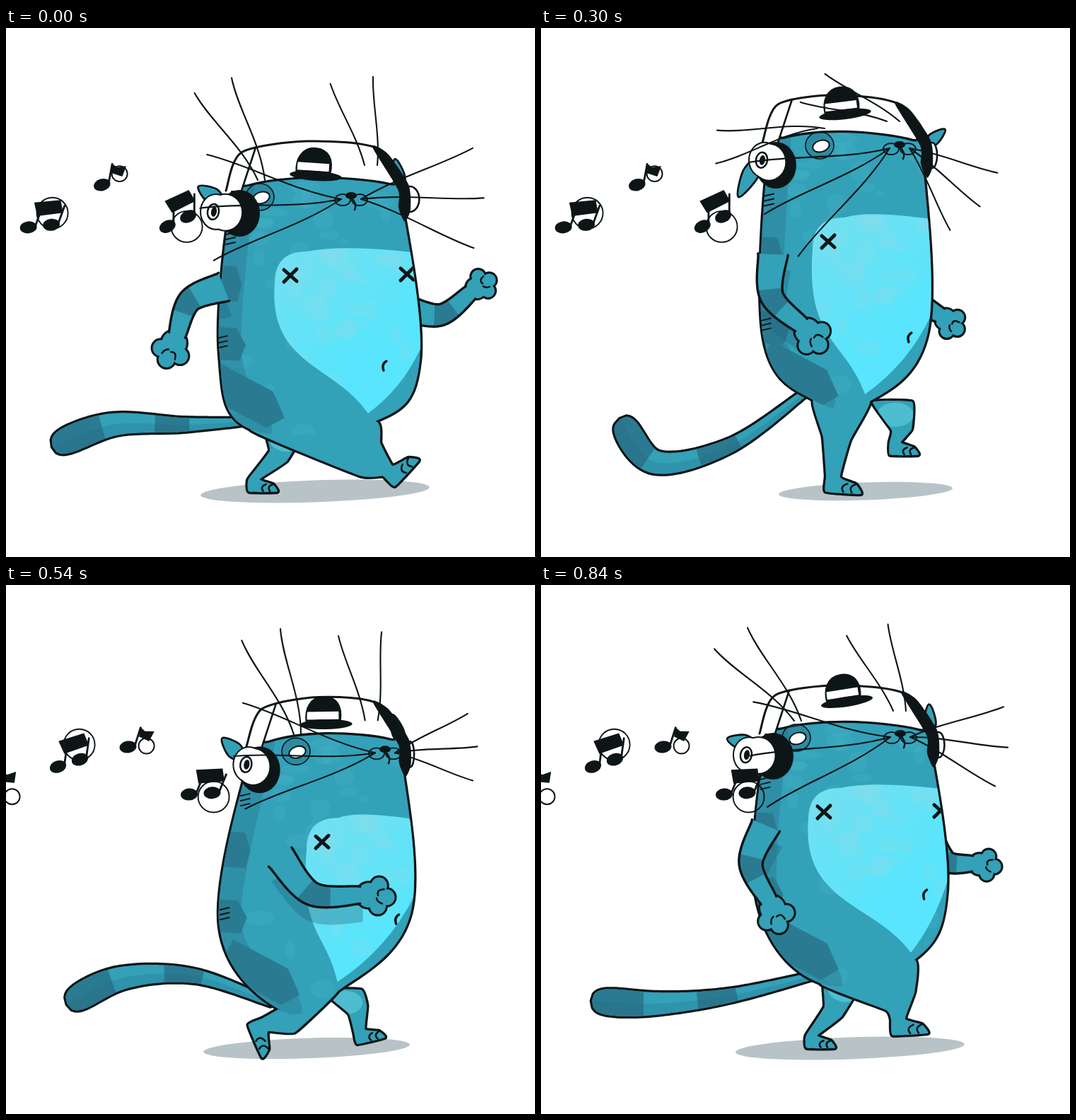
An HTML page with a canvas that plays this animation: 748 by 748 pixels, repeating every 0.9 s.

```html
<!DOCTYPE html>
<html lang="en">
<head>
<meta charset="utf-8">
<title>Strolling cat</title>
<style>
html, body { margin: 0; width: 100%; height: 100%; overflow: hidden; background: #fff; }
canvas { display: block; width: 100vmin; height: 100vmin; }
</style>
</head>
<body>
<canvas id="stage" width="748" height="748"></canvas>
<script>
const g = document.getElementById('stage').getContext('2d');
const STEP = 60, STEPS = 15;
const INK = '#0d1517', TEAL = '#33a1b8', DARK = '#2a7b91', SHADE = 'rgba(32,98,122,.35)';

// Walk cycle. body: head left and right, right side, crotch, rump, left side.
// belly: top corner and tip. legs: knee, ankle, foot angle (far one starts with its hip).
// arm: shoulder, wrist. tail: two bends and tip. face: eye, nose, cup depth.
// swing: whisker angle. lift: hat height. shadow: centre and reach.
const poses = [
  { step: 0, body: [320,224, 556,222, 585,470, 522,556, 345,567, 302,460], belly: [380,316, 512,545],
    leg: [515,610, 539,627, -47], farLeg: [.28, 385,605, 350,638, 0], arm: [308,366, 242,434], farArm: [657,374],
    tail: [250,561, 150,561, 66,592], face: [361,240, 488,240, -33], swing: [-117], lift: [14], shadow: [437,162] },
  { step: 3, body: [325,198, 548,204, 567,450, 455,556, 378,538, 297,435], belly: [370,288, 453,550],
    leg: [424,600, 424,633, 0], farLeg: [1.05, 458,600, 420,605, 90], arm: [312,330, 252,424], farArm: [619,387],
    tail: [250,562, 155,568, 88,590], face: [390,212, 512,207, -22], swing: [-143], lift: [20], shadow: [438,112] },
  { step: 5, body: [322,156, 538,160, 547,430, 465,528, 385,526, 315,440], belly: [384,268, 458,518],
    leg: [418,580, 412,634, 4], farLeg: [1.4, 510,568, 500,586, 0], arm: [328,320, 368,420], farArm: [564,406],
    tail: [268,590, 162,614, 112,553], face: [396,167, 507,168, -16], swing: [-190], lift: [36], shadow: [459,123] },
  { step: 7, body: [356,226, 564,222, 576,465, 475,595, 362,606, 302,480], belly: [429,334, 450,580],
    leg: [378,620, 348,637, 0], farLeg: [1, 512,605, 541,631, -40], arm: [383,374, 478,457], farArm: [525,440],
    tail: [270,565, 160,562, 84,594], face: [440,233, 552,238, -6], swing: [-98], lift: [31], shadow: [459,166] },
  { step: 10, body: [345,222, 553,218, 570,465, 466,564, 400,598, 302,485], belly: [423,327, 478,552],
    leg: [410,612, 375,613, 100], farLeg: [1.1, 490,598, 478,630, 0], arm: [390,390, 512,429], farArm: [520,430],
    tail: [265,547, 165,553, 88,592], face: [398,238, 528,234, -20], swing: [-116], lift: [21], shadow: [408,136] },
  { step: 12, body: [325,190, 545,196, 564,440, 487,548, 400,551, 306,440], belly: [408,303, 485,520],
    leg: [463,585, 444,607, 35], farLeg: [.3, 422,595, 416,634, 0], arm: [362,348, 412,444], farArm: [552,404],
    tail: [265,582, 160,600, 71,602], face: [384,201, 515,197, -41], swing: [-160], lift: [22], shadow: [408,123] },
  { step: 14, body: [318,204, 547,206, 574,430, 528,530, 395,563, 306,450], belly: [378,287, 523,520],
    leg: [508,588, 504,614, -3], farLeg: [.25, 413,603, 382,637, 0], arm: [318,340, 322,446], farArm: [610,394],
    tail: [265,581, 160,592, 72,588], face: [363,217, 508,213, -34], swing: [-129], lift: [40], shadow: [437,162] }
];

const RAD = Math.PI / 180;
const mix = (a, b, u) => a + (b - a) * u;
const mixAll = (a, b, u) => a.map((v, i) => mix(v, b[i], u));
const shift = ([x, y], dx, dy) => [x + dx, y + dy];
const polar = ([x, y], len, deg) => [x + len * Math.cos(deg * RAD), y + len * Math.sin(deg * RAD)];
const toward = (a, b, d) => mixAll(a, b, d / Math.hypot(b[0] - a[0], b[1] - a[1]));
const pairs = a => a.flatMap((v, i) => i % 2 ? [] : [[v, a[i + 1]]]);
const random = n => (Math.sin(n * 12.9898) * 43758.5 % 1 + 1) % 1;
const fill = (path, color) => { g.fillStyle = color; g.fill(path); };
const ink = (path, w = 3) => { g.strokeStyle = INK; g.lineWidth = w; g.stroke(path); };

function poseAt(step) {
  let i = poses.length - 1;
  while (poses[i].step > step) i--;
  const a = poses[i], b = poses[(i + 1) % poses.length];
  const u = (step - a.step) / ((b.step || STEPS) - a.step), out = {};
  for (const part in a) if (part !== 'step') out[part] = mixAll(a[part], b[part], u);
  return out;
}

function curve(pts, k = .17, open = false) {
  const n = pts.length, path = new Path2D();
  const at = i => pts[open ? Math.max(0, Math.min(n - 1, i)) : (i + n) % n];
  path.moveTo(...pts[0]);
  for (let i = 0; i < n - (open ? 1 : 0); i++) {
    const [p, q, r, s] = [at(i - 1), at(i), at(i + 1), at(i + 2)];
    path.bezierCurveTo(q[0] + (r[0] - p[0]) * k, q[1] + (r[1] - p[1]) * k,
      r[0] - (s[0] - q[0]) * k, r[1] - (s[1] - q[1]) * k, ...r);
  }
  if (!open) path.closePath();
  return path;
}

function poly(pts, open) {
  const path = new Path2D();
  pts.forEach(p => path.lineTo(...p));
  if (!open) path.closePath();
  return path;
}

function oval([x, y], rx, ry = rx, deg = 0) {
  const path = new Path2D();
  path.ellipse(x, y, rx, ry, deg * RAD, 0, 7);
  return path;
}

function arc(a, c, b) {
  const path = new Path2D();
  path.moveTo(...a);
  path.quadraticCurveTo(...c, ...b);
  return path;
}

function inside(path, draw) {
  g.save();
  g.clip(path);
  draw();
  g.restore();
}

// Turns local coordinates at a point into stage coordinates.
const frame = ([x, y], deg, size = 1) => {
  const c = Math.cos(deg * RAD) * size, s = Math.sin(deg * RAD) * size;
  return (u, v) => [x + u * c - v * s, y + u * s + v * c];
};

// A limb of changing width along a smooth centre line.
function tube(pts, width) {
  const n = pts.length, N = 60, mid = [], left = [], right = [];
  for (let i = 0; i <= N; i++) {
    const s = i / N * (n - 1), j = Math.min(n - 2, Math.floor(s)), t = s - j;
    const v = m => pts[Math.max(0, Math.min(n - 1, j + m))];
    mid.push([0, 1].map(c => {
      const m1 = (v(1)[c] - v(-1)[c]) / 2, m2 = (v(2)[c] - v(0)[c]) / 2, d = v(1)[c] - v(0)[c];
      return v(0)[c] + t * (m1 + t * (3 * d - 2 * m1 - m2 + t * (m1 + m2 - 2 * d)));
    }));
  }
  mid.forEach((m, i) => {
    const p = mid[Math.max(0, i - 1)], q = mid[Math.min(N, i + 1)];
    const dx = q[0] - p[0], dy = q[1] - p[1], w = width(i / N) / (Math.hypot(dx, dy) || 1);
    left.push(shift(m, dy * w, -dx * w));
    right.push(shift(m, -dy * w, dx * w));
  });
  const part = (from, to, l = left, r = right) => {
    const i = Math.round(from * N), j = Math.round(to * N) + 1;
    return poly([...l.slice(i, j), ...r.slice(i, j).reverse()]);
  };
  return { mid, left, right, part };
}

function drawTail(rump, bends) {
  const t = tube([shift(rump, -12, -10), ...pairs(bends)],
    u => (5 + 18 * u ** 1.2) * Math.sqrt(1 - Math.max(0, (u - .72) / .28) ** 3));
  const whole = t.part(0, 1);
  ink(whole, 6.5);
  fill(whole, TEAL);
  fill(t.part(.72, 1), DARK);
  fill(t.part(.3, .46), DARK);
  fill(t.part(0, 1, t.left, t.mid), 'rgba(32,98,122,.22)');
}

// Elbows always bend away from the walking direction.
function armLine(shoulder, wrist, sag = .22) {
  const [dx, dy] = [wrist[0] - shoulder[0], wrist[1] - shoulder[1]];
  return [shoulder, shift(mixAll(shoulder, wrist, .5), -dy * sag, dx * sag), wrist];
}

function drawArm(line, size) {
  const t = tube(line, u => (21 - 9 * u) * (size + 1) / 2), [, elbow, wrist] = line;
  const at = frame(wrist, Math.atan2(wrist[1] - elbow[1], wrist[0] - elbow[0]) / RAD, size);
  const hand = [[12, 0, 17], [26, -14, 11], [37, 2, 11], [25, 15, 11]].map(([u, v, r]) => oval(at(u, v), r * size));
  hand.forEach(h => ink(h, 6));
  hand.forEach(h => fill(h, TEAL));
  fill(t.part(0, 1), TEAL);
  fill(t.part(.42, .68), DARK);
  ink(poly(t.left, true), 3.4);
  ink(poly(t.right, true), 3.4);
  ink(arc(at(33, -9), at(22, -8), at(25, 0)), 2.5);
  ink(arc(at(31, 11), at(24, 9), at(23, 4)), 2.5);
}

function legShape(back, front, [kx, ky, ax, ay, deg], knee, size) {
  const hip = mixAll(back, front, .5), dx = ax - hip[0], dy = ay - hip[1];
  const w = knee / Math.hypot(dx, dy), at = frame([ax, ay], deg, size);
  const path = curve([back, [kx - dy * w, ky + dx * w], at(-9, 0), at(-8, 22), at(42, 22), at(34, 9), at(11, 0),
    [kx + dy * w, ky - dx * w], front], .06);
  const toes = () => [17, 29].forEach(x => ink(arc(at(x + 5, 9), at(x - 6, 13), at(x, 21)), 2.6));
  return { path, toes };
}

function leaf(tip, base, w) {
  const len = Math.hypot(base[0] - tip[0], base[1] - tip[1]);
  const at = frame(tip, Math.atan2(base[1] - tip[1], base[0] - tip[0]) / RAD);
  const path = curve([tip, at(len * .55, -w), base, at(len * .55, w)], .15);
  ink(path, 5.5);
  fill(path, TEAL);
}

function bellyShape([ax, ay, tx, ty], [rx, ry]) {
  const w = tx - ax, h = ty - ay, path = new Path2D();
  path.moveTo(ax, ay + 45);
  path.bezierCurveTo(ax - 10, ay + .7 * h, tx - .35 * w, ty - .3 * h, tx, ty);
  path.quadraticCurveTo(mix(tx, rx, .7), mix(ty, ry, .5), rx + 5, ry - 25);
  path.lineTo(rx + 30, ay + 6);
  path.quadraticCurveTo(mix(ax, rx, .5), ay - 12, ax + 45, ay);
  path.quadraticCurveTo(ax, ay, ax, ay + 45);
  return path;
}

function blotches(x, y, w, h, count, color) {
  for (let i = 1; i <= count; i++)
    fill(oval([x + random(i) * w, y + random(i + 50) * h], 6 + random(i + 90) * 16, 5 + random(i + 130) * 10), color);
}

function drawBody(p, [tl, tr, right, crotch, rump, left]) {
  const body = curve([toward(tl, left, 24), toward(tl, tr, 24), shift(mixAll(tl, tr, .5), 0, -10),
    toward(tr, tl, 14), toward(tr, right, 20), right, crotch, rump, left], .18);
  const leg = legShape(rump, crotch, p.leg, 13 + .08 * Math.hypot(crotch[0] - rump[0], crotch[1] - rump[1]), 1);
  ink(body, 6.5);
  ink(leg.path, 6.5);
  fill(body, TEAL);
  fill(leg.path, TEAL);
  const belly = bellyShape(p.belly, right), [bx, by] = p.belly;
  const turn = tr[0] - p.face[2];
  inside(body, () => {
    blotches(tl[0], tl[1], 240, 380, 34, 'rgba(92,192,210,.12)');
    g.strokeStyle = 'rgba(32,98,122,.28)';
    g.lineWidth = 62;
    g.stroke(curve([rump, left, tl], .17, true));
    const band = (u, reach, size) => {
      const at = frame(mixAll(left, u < 0 ? rump : tl, Math.abs(u)), u < 0 ? 28 : 4);
      fill(poly([at(-40, -size), at(reach * .6, -size), at(reach, 0), at(reach * .8, size), at(-40, size)]), DARK);
    };
    band(-.5, 80, 25);
    band(.06, 36, 23);
    band(.42, 24, 25);
    const tone = g.createLinearGradient(bx, by, bx + 120, by + 150);
    tone.addColorStop(0, '#74dfef');
    tone.addColorStop(1, '#58e5fd');
    fill(belly, tone);
    inside(belly, () => blotches(bx, by, 190, 200, 30, 'rgba(150,214,224,.2)'));
    const shadow = armLine(...pairs(p.arm)).map(q => shift(q, 4, 22));
    fill(tube(shadow, u => 21 - 5 * u).part(0, 1), SHADE);
    [[bx + 22, by + 34], [bx + 187, by + 32]].forEach(c => {
      ink(poly([shift(c, -9, -8), shift(c, 9, 8)], true), 5);
      ink(poly([shift(c, 9, -9), shift(c, -9, 9)], true), 5);
    });
    const navel = [right[0] - 6 - .65 * turn, right[1] + 8];
    ink(arc(shift(navel, 3, -7), shift(navel, -4, -3), shift(navel, -1, 6)), 3.5);
  });
  leg.toes();
  [.72, .1].forEach(u => [0, 7, 14].forEach(dy => {
    const c = shift(mixAll(left, tl, u), 2, dy);
    ink(poly([shift(c, -6, 2), shift(c, 7, -1)], true), 2);
  }));
}

function drawHat(c, lift) {
  g.save();
  g.translate(c[0], c[1] - lift);
  g.rotate((22 - lift) / 2 * RAD);
  const dome = new Path2D('M-28-4C-30-22-22-39-3-39S24-24 20-4Z');
  fill(dome, INK);
  inside(dome, () => {
    g.fillStyle = '#fff';
    g.fillRect(-27, -18, 45, 11);
  });
  ink(dome, 2);
  fill(oval([0, 0], 37, 7), INK);
  g.restore();
}

function drawFace(eye, nose) {
  const ring = oval(shift(eye, -2, -1), 20, 19);
  fill(ring, SHADE);
  ink(ring, 1.6);
  const white = oval(eye, 12, 8, -18);
  fill(white, '#fff');
  ink(white, 2);
  for (const s of [-1, 1]) {
    const cheek = oval(shift(nose, s * 12, 3), 11, 8);
    fill(cheek, TEAL);
    ink(cheek, 1.8);
  }
  fill(oval(shift(nose, 0, -3), 8, 5), INK);
  ink(arc(nose, shift(nose, 9, 8), shift(nose, 5, 17)), 2.5);
}

function drawHeadphones(cup, far, depth) {
  const base = shift(cup, -10, -32), a = shift(base, 22, -58), b = shift(far, -36, -74);
  const top = shift(mixAll(a, b, .45), 0, -12);
  const pillar = [shift(base, -9, 0), shift(a, -9, 4), shift(a, 11, -3), shift(base, 13, 0)];
  fill(poly(pillar), '#fff');
  ink(curve([pillar[0], pillar[1], top, b, far], .13, true), 3);
  ink(poly(pillar.slice(2), true), 2.6);
  fill(curve([shift(b, -10, -4), shift(b, 12, 6), shift(far, 5, -25), shift(far, 8, 10), shift(far, 0, 28),
    shift(far, -9, 8), shift(far, -10, -18)], .12), INK);
  fill(oval(cup, 29, 33), INK);
  const front = shift(cup, depth, -12 - .3 * depth);
  const shell = [oval(mixAll(front, cup, .4), 23, 25), oval(front, 21, 24)];
  shell.forEach(s => ink(s, 4));
  shell.forEach(s => fill(s, '#fff'));
  ink(oval(shift(front, -4, 0), 8, 11, 10), 2.5);
  fill(oval(shift(front, -3, 0), 4, 7, 10), INK);
}

function whisker(root, len, deg, bend) {
  const at = frame(root, deg, len), path = new Path2D();
  path.moveTo(...root);
  path.bezierCurveTo(...at(.35, bend), ...at(.7, -bend / 2), ...at(1, 0));
  ink(path, 2.1);
}

// All whiskers follow one swing, each group with its own share of it.
function drawWhiskers(eye, nose, tr, swing) {
  const fan = -(swing + 118) * .55, turn = tr[0] - nose[0];
  [-1, 1].forEach(s => {
    whisker(shift(eye, 5 * s, -25), 152, swing + 9 * s, .07);
    whisker([tr[0] - 40 + 9 * s, tr[1] - 28], 125, swing * .75 - 15 + 10 * s, .05);
  });
  [-1, 0, 1].forEach(s => {
    whisker(shift(nose, 14, 2), 92 + 1.2 * turn, fan + 24 * s, -.04);
    whisker(shift(nose, -14, 2), 200, 176 - .6 * fan - 22 * s, -.05);
  });
}

function drawNote(c, tilt, pair) {
  g.save();
  g.translate(...c);
  g.rotate(tilt * RAD);
  const heads = pair ? [[-15, 20], [16, 10]] : [[-9, 12]];
  heads.forEach(([x, y]) => {
    fill(oval([x, y], 12, 8.5, -18), INK);
    ink(poly([[x + 9, y - 2], [x + 13, y - 30]], true), 2.8);
  });
  fill(new Path2D(pair ? 'M-14-16L22-27L29-10L-6 2Z' : 'M3-19L11-14L24-16L19-1L4-5Z'), INK);
  g.restore();
}

// Notes and bubbles leave the headphones at a steady beat and drift over a hump.
function drawMusic(step) {
  const age = born => ((step - born) % STEPS + STEPS) % STEPS;
  const drift = (t, low, rise) => {
    const x = 305 - 38 * t;
    return [x, low - rise * Math.sin(Math.PI * Math.max(0, x) / 300) ** 2];
  };
  for (let i = 0; i < 6; i++) {
    const note = age(.8 + 2.5 * i), bubble = age(1.2 + 2.5 * i);
    if (bubble < 9) ink(oval(drift(bubble, 300, 95), i % 2 ? 22 : 11), 1.9);
    if (note < 9) drawNote(drift(note, 284, 74), 14 * Math.sin(note * 2.2), i % 2);
  }
}

function draw(step) {
  const p = poseAt(step), body = pairs(p.body), [tl, tr, right, crotch, rump] = body;
  const [eye, nose] = pairs(p.face.slice(0, 4)), swing = p.swing[0];
  const cup = shift(tl, 10, 38), far = shift(tr, 8, 24);
  g.fillStyle = '#fff';
  g.fillRect(0, 0, 748, 748);
  g.lineCap = g.lineJoin = 'round';
  fill(oval([p.shadow[0], 655], p.shadow[1], 3 + p.shadow[1] / 13, -2), '#b8c3c8');
  drawTail(rump, p.tail);

  const hip = mixAll(rump, crotch, p.farLeg[0]);
  const leg = legShape(shift(hip, -28, 0), shift(hip, 28, 0), p.farLeg.slice(1), 14, .8);
  ink(leg.path, 6.5);
  fill(leg.path, TEAL);
  inside(leg.path, () => fill(oval(shift(hip, 4, 18), 26, 17), '#4fbdd0'));
  leg.toes();

  drawArm(armLine(shift(mixAll(tr, right, .7), -14, 0), p.farArm), .85);
  leaf(polar(tr, 36, 152 - swing - 8), shift(tr, 4, 8), 7);
  const shell = oval(shift(far, 7, -4), 2 + Math.max(0, tr[0] - nose[0]) / 6, 18);
  fill(shell, '#fff');
  ink(shell, 2.6);

  drawBody(p, body);
  leaf(polar(cup, 68, swing - 30), shift(cup, -22, -14), 10);
  drawArm(armLine(...pairs(p.arm)), 1.02);
  drawFace(eye, nose);
  drawHat(mixAll(tl, tr, .5), p.lift[0]);
  drawHeadphones(cup, far, p.face[4]);
  drawWhiskers(eye, nose, tr, swing);
  drawMusic(step);
}

const start = performance.now();
function tick() {
  draw(Math.floor((performance.now() - start) / STEP) % STEPS);
  requestAnimationFrame(tick);
}
tick();
</script>
</body>
</html>
```
